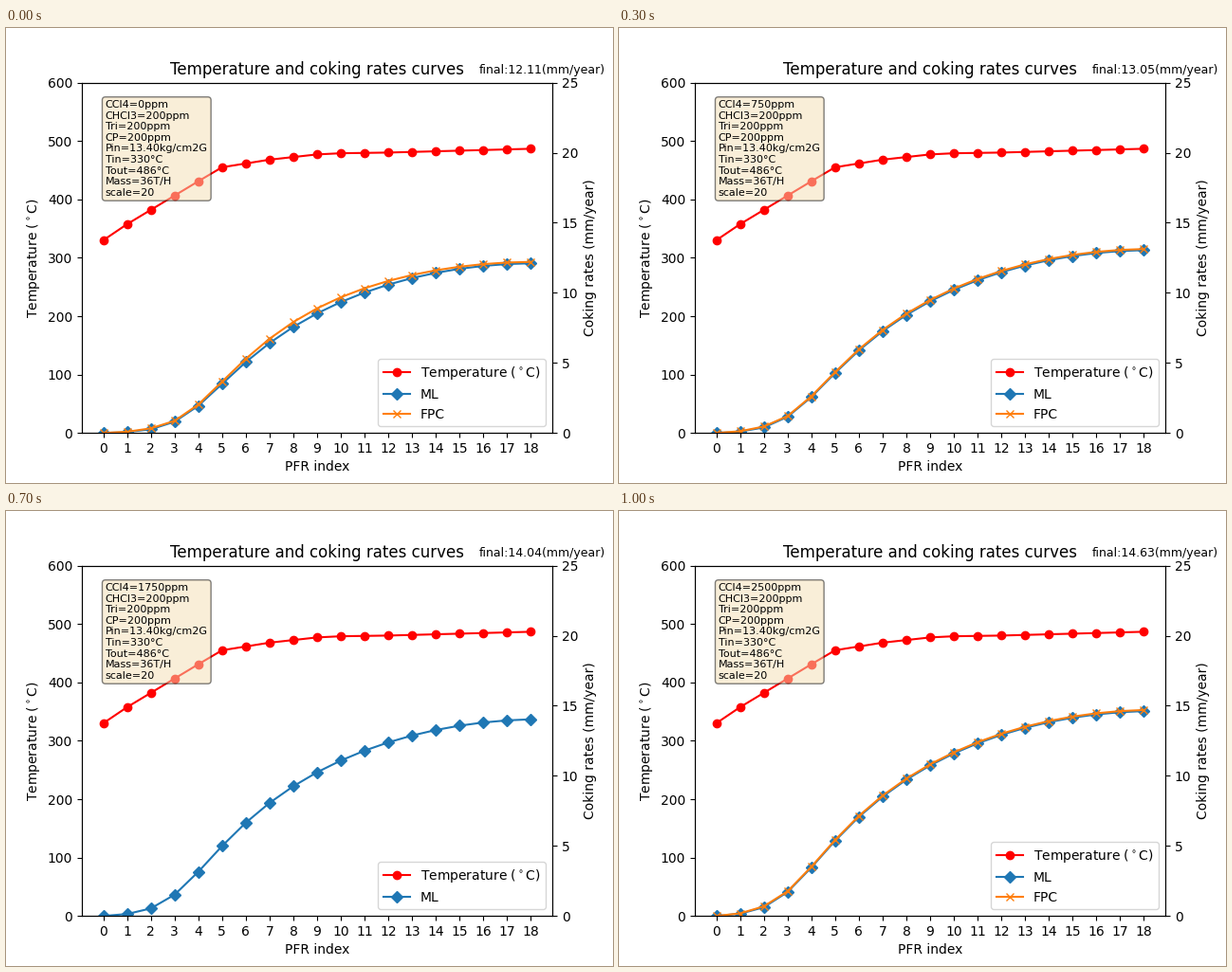
A matplotlib script for the animation above (1100 ms loop, 640 by 480 pixels).

```python
import numpy as np
import matplotlib.pyplot as plt
from matplotlib.animation import FuncAnimation

STEP = 250
FRAMES = 11
NO_FPC = (1750, 2250)

idx = np.arange(19)
temps = np.interp(idx, [0, 1, 4, 5, 7, 9, 10, 12, 18],
                  [330, 357.5, 431, 455, 468, 477, 479, 480.2, 486.7])


def final_rate(dose):
    return np.interp(dose, [0, 500, 1000, 1500, 1750, 2000, 2500],
                     [12.11, 12.82, 13.28, 13.80, 14.04, 14.26, 14.63])


def ml_rates(dose):
    """Coking starts on a logistic ramp, then slows down along the reactor."""
    p = (1 - np.exp(-dose / 1500)) / (1 - np.exp(-2500 / 1500))
    mid = idx[1:] - 0.5
    onset = 1 / (1 + np.exp(-1.33 * (mid - 3.62 + 0.62 * p)))
    decay = 1 + 0.555 * np.exp(-(mid - 6) / 4)
    slope = (0.0532 - 0.0042 * p) * onset * decay
    rest = 1 - np.concatenate([[0], np.cumsum(slope)])
    return final_rate(dose) * (1 - rest ** 2)


def fpc_rates(dose):
    """ML rates plus a hump that fades with dose and a small offset."""
    x = idx / 8.8
    hump = 0.28 * np.exp(-dose / 250) * (x * np.exp(1 - x)) ** 8
    offset = 0.08 * (1 - np.exp(-(idx / 4) ** 2)) + 0.05 * np.exp(-(idx - 2.0) ** 2)
    return ml_rates(dose) + hump + offset


def info_text(dose):
    return "\n".join([f"CCl4={dose}ppm", "CHCl3=200ppm", "Tri=200ppm",
                      "CP=200ppm", "Pin=13.40kg/cm2G", "Tin=330°C",
                      "Tout=486°C", "Mass=36T/H", "scale=20"])


fig, ax = plt.subplots(figsize=(6.4, 4.8), dpi=100)
ax2 = ax.twinx()

temp_label = r"Temperature ($^\circ$C)"
temp_line, = ax.plot(idx, temps, "r-o", label=temp_label)
ml_line, = ax2.plot(idx, ml_rates(0), "-D", color="C0", label="ML")
fpc_line, = ax2.plot(idx, fpc_rates(0), "-x", color="C1", label="FPC")

ax.set_title("Temperature and coking rates curves")
ax.set_xlabel("PFR index")
ax.set_ylabel(temp_label)
ax2.set_ylabel("Coking rates (mm/year)")
ax.set_xticks(idx)
ax.set_ylim(0, 600)
ax2.set_ylim(0, 25)

info = ax.text(0.05, 0.95, "", transform=ax.transAxes, fontsize=8, va="top",
               bbox=dict(boxstyle="round", facecolor="wheat", alpha=0.5))
final = ax.text(15.8, 615, "", fontsize=9)


def update(k):
    dose = k * STEP
    has_fpc = dose not in NO_FPC
    ml_line.set_ydata(ml_rates(dose))
    fpc_line.set_ydata(fpc_rates(dose))
    fpc_line.set_visible(has_fpc)
    info.set_text(info_text(dose))
    final.set_text(f"final:{final_rate(dose):.2f}(mm/year)")
    handles = [temp_line, ml_line] + [fpc_line] * has_fpc
    ax2.legend(handles=handles, loc="lower right")


anim = FuncAnimation(fig, update, frames=FRAMES, interval=100,
                     init_func=lambda: update(0), repeat=True, repeat_delay=0)
plt.show()
```
